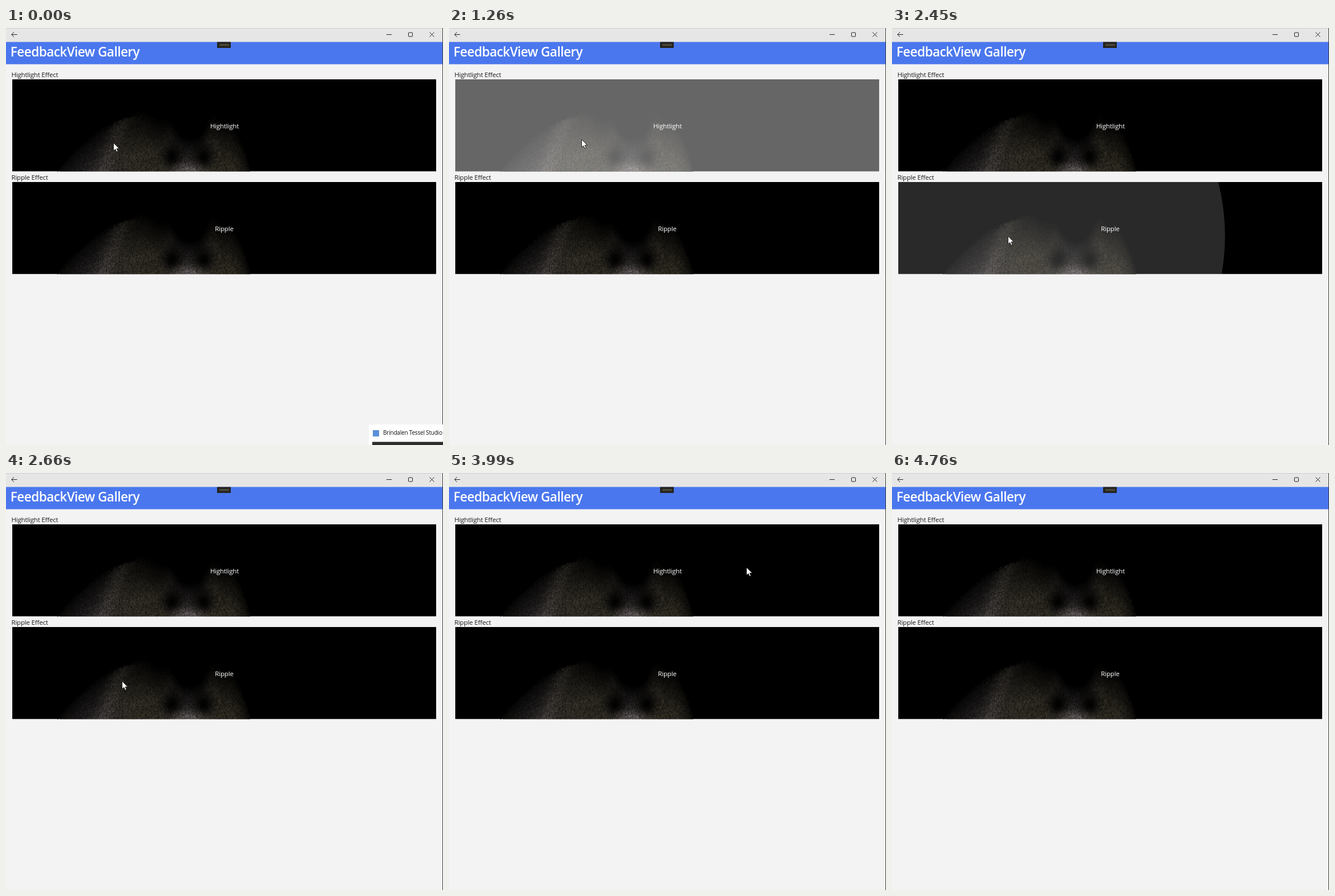
Recreate the animation shown at these times as an HTML page with a canvas. Size 766 by 731 pixels, loop 5.39 s.

```html
<!DOCTYPE html>
<html lang="en">
<head>
<meta charset="utf-8">
<title>FeedbackView Gallery</title>
<style>
html, body { margin: 0; width: 100%; height: 100%; overflow: hidden; background: #f3f3f3; }
canvas, svg { position: absolute; left: 0; top: 0; display: block; }
text { font: 11.5px "Open Sans", "Noto Sans", sans-serif; letter-spacing: -.2px; fill: #1b1b1b; }
.title { font-size: 22.5px; font-weight: 600; letter-spacing: -.52px; fill: #fff; }
.caption { fill: #fff; text-anchor: middle; }
.tip { font-size: 10px; letter-spacing: -.2px; fill: #111; }
</style>
</head>
<body>
<canvas id="photos" width="766" height="731"></canvas>
<svg width="766" height="731" viewBox="0 0 766 731">
  <defs>
    <clipPath id="lower"><rect x="11" y="270" width="743" height="161.5"/></clipPath>
  </defs>

  <rect width="766" height="25" fill="#e6e6e6"/>
  <rect width="766" height="1" fill="#cfcfcf"/>
  <g fill="none" stroke="#222">
    <path d="M19.5 11.5H10M14 7.2 9.7 11.5 14 15.8"/>
    <path d="M667 11.5H676"/>
    <rect x="705.5" y="8" width="7" height="7" rx="1"/>
    <path d="M742.5 7.5 750.5 15.5M750.5 7.5 742.5 15.5"/>
  </g>
  <rect y="24.5" width="766" height="39" fill="#4a77ee"/>
  <text class="title" x="7.8" y="49.5">FeedbackView Gallery</text>
  <rect x="370" y="24.5" width="24" height="10.5" fill="#25231c"/>
  <rect x="374" y="28" width="17" height="3.5" fill="#4a473c"/>

  <text x="9.5" y="86">Hightlight Effect</text>
  <text x="9.5" y="266">Ripple Effect</text>

  <rect id="glow" x="11" y="90" width="743" height="161.5" fill="#fff" opacity="0"/>
  <g clip-path="url(#lower)"><circle id="ripple" fill="#fff" opacity="0"/></g>
  <text class="caption" x="383" y="176">Hightlight</text>
  <text class="caption" x="382.5" y="356">Ripple</text>

  <rect x="765" width="1" height="731" fill="#3a3a3a"/>

  <g id="popup">
    <rect x="636" y="695" width="130" height="36" fill="#fff"/>
    <rect x="643" y="705" width="11" height="11" fill="#5b8fd6"/>
    <text class="tip" x="661" y="713">Brindalen Tessel Studio</text>
    <rect x="642" y="725.5" width="124" height="5.5" fill="#2d2d2d"/>
  </g>

  <path id="cursor" d="M.5 .5V14.2L3.7 11.3 5.9 16.2 8.1 15.2 6 10.4H10.4Z" fill="#fff" stroke="#1a1a1a" stroke-width=".9"/>
</svg>
<script>
const LOOP = 5390, STEP = 70;
const $ = id => document.getElementById(id);
const set = (el, attrs) => { for (const k in attrs) el.setAttribute(k, attrs[k]); };
const span = (t, from, to) => Math.min(1, Math.max(0, (t - from) / (to - from)));
const smooth = p => p * p * (3 - 2 * p);
const bump = (d, width) => Math.exp(-((d / width) ** 2));

// Upper edge of the head: a long slope on the left, a steep side on the right, two tufts.
function headTop(x) {
  const dome = x < 255 ? 1 - ((255 - x) / 182) ** 2 : 1 - ((x - 255) / 164) ** 6;
  return 165 - 113 * dome - 28 * (bump(x - 278, 16) + bump(x - 348, 14));
}

// Brightness of the fur; the face mirrors around MID.
const MID = 308;
function furLight(x, y) {
  const side = Math.abs(x - MID);
  return 46 * span(y - headTop(x), -12, 75)
    + 20 * bump(x + .4 * y - 222, 16)
    - 42 * bump(side, 52) * bump(y - 72, 56)
    - 36 * bump(side - 28, 15) * bump(y - 138, 20)
    + 66 * bump(side, 32) * bump(y - 161, 14);
}

function paintPhoto(ctx, left, top) {
  const W = 743, H = 161.5;
  let seed = 11;
  const rnd = () => (seed = seed * 16807 % 2147483647) / 2147483647;
  ctx.save();
  ctx.translate(left, top);
  ctx.beginPath();
  ctx.rect(0, 0, W, H);
  ctx.clip();
  ctx.fillRect(0, 0, W, H);
  for (let y = 18; y < H; y += 2) {
    for (let x = 73; x < 418; x++) {
      const edge = headTop(x) + 10 * rnd(), shade = .55 + .9 * rnd();
      const v = furLight(x, y) * shade;
      if (y < edge || v < 3) continue;
      const warm = .72 + .2 * bump(x - 130, 70) + .2 * bump(x - MID, 35);
      ctx.strokeStyle = `rgb(${v}, ${v * .93}, ${v * Math.min(.93, warm)})`;
      ctx.beginPath();
      ctx.moveTo(x, y);
      ctx.lineTo(x + (x - MID) / 100 + rnd() - .5, y + 3);
      ctx.stroke();
    }
  }
  ctx.restore();
}

// Each move starts where the one before ended; lift bends its path upwards.
const home = { x: 188, y: 201 };
const moves = [
  { from: 0, to: 210, x: 221.5, y: 192 },
  { from: 1120, to: 1260, x: 232, y: 195 },
  { from: 1540, to: 2030, x: 203, y: 364.5 },
  { from: 2800, to: 3360, x: 619, y: 392, lift: 36 },
  { from: 3500, to: 3850, x: 521, y: 165 },
  { from: 4340, to: 4620, x: 608, y: 221 },
  { from: 4620, to: 4760, x: 904, y: 349 }
];
function pointer(t) {
  let { x, y } = home;
  for (const m of moves) {
    const p = smooth(span(t, m.from, m.to));
    x += (m.x - x) * p;
    y += (m.y - y) * p - (m.lift || 0) * Math.sin(Math.PI * p);
  }
  return { x, y };
}

const presses = [{ down: 290, up: 1225 }, { down: 4070, up: 4400 }];
const glowAt = t => presses.reduce((sum, { down, up }) =>
  sum + .5 * (span(t, down, down + 200) - span(t, up, up + 175)), 0);

// A ripple grows from the clicked point to the farthest corner of the lower panel.
const clicks = [2117, 3361], RIPPLE = 489;
function rippleAt(t) {
  const click = clicks.find(c => t > c && t < c + RIPPLE);
  if (!click) return { opacity: 0 };
  const { x, y } = pointer(click), p = (t - click) / RIPPLE;
  const reach = Math.hypot(Math.max(x - 11, 754 - x), Math.max(y - 270, 431.5 - y));
  return { cx: x, cy: y, r: reach * p, opacity: .5 * (1 - p) };
}

function draw(time) {
  const t = Math.floor(time % LOOP / STEP) * STEP;
  const { x, y } = pointer(t);
  set($('cursor'), { transform: `translate(${x} ${y})` });
  set($('glow'), { opacity: glowAt(t) });
  set($('ripple'), rippleAt(t));
  set($('popup'), { opacity: 1 - span(t, 0, 210) });
}

const ctx = $('photos').getContext('2d');
for (const top of [90, 270]) paintPhoto(ctx, 11, top);

const start = performance.now();
function tick() {
  draw(performance.now() - start);
  requestAnimationFrame(tick);
}
tick();
</script>
</body>
</html>
```
